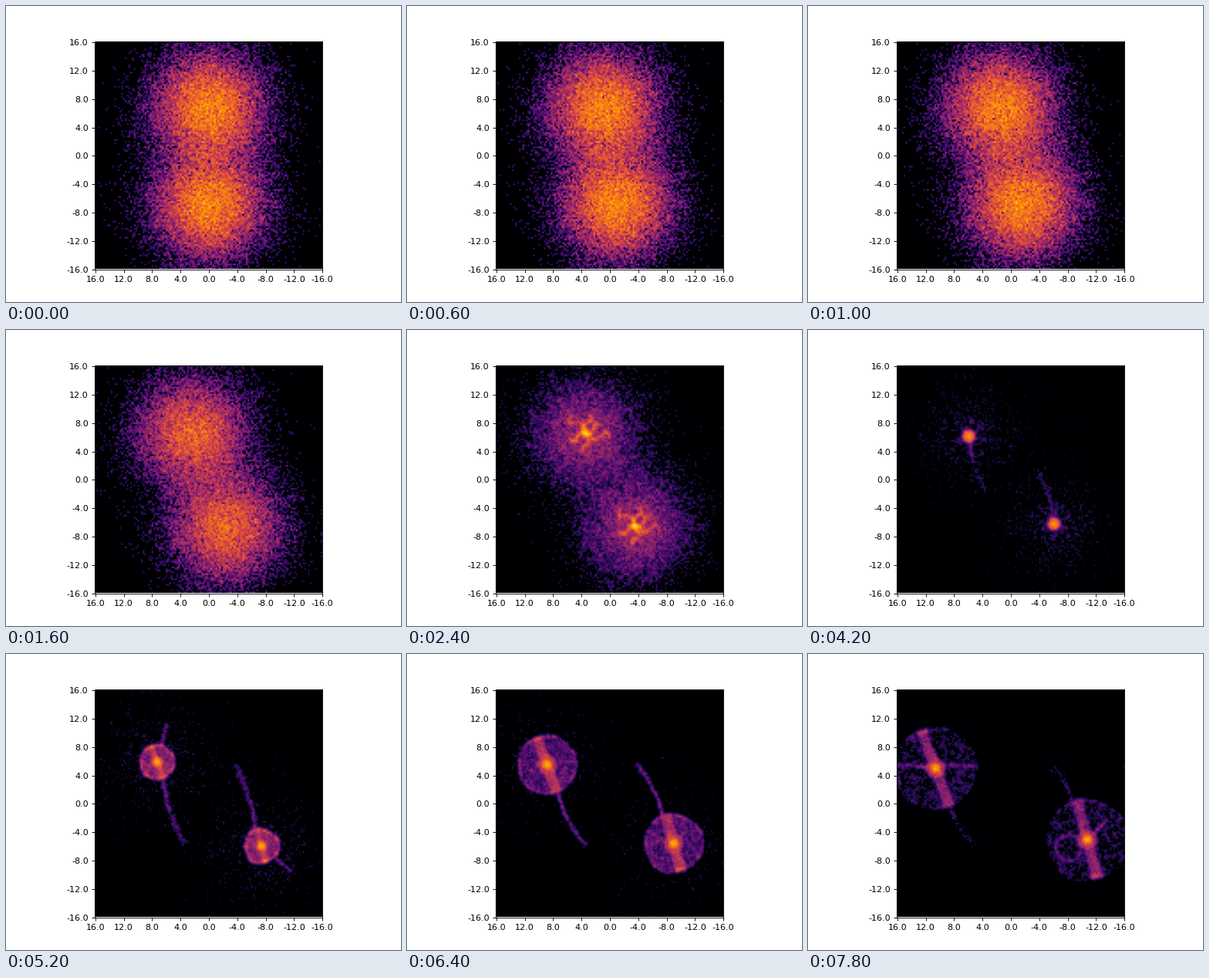
Write a matplotlib script that moves like this. It is 512x384 px and loops after 8000 ms.

```python
import numpy as np
import matplotlib.pyplot as plt
from matplotlib.animation import FuncAnimation

FRAMES, STEP = 40, 200
GRID, HALF = 128, 16
CELL = 2 * HALF / GRID
POOL = 24000


def ramp(t, a, b):
    x = np.clip((t - a) / (b - a), 0, 1)
    return x * x * (3 - 2 * x)


def bump(t, mid, width):
    return np.exp(-((t - mid) / width) ** 2)


# Visible particles of each part over time (seconds): gas falls in
# until 3.5 s, then a shell with a bar and a tail grows out of the core.
COUNTS = {
    "halo": lambda t: 22000 * bump(max(t, .8), .8, 1.56)
    + 450 * ramp(t, 3, 4) * (1 - ramp(t, 5, 8)),
    "core": lambda t: 600 * ramp(t, 2, 3.2) + 3000 * bump(t, 3.5, .4),
    "arms": lambda t: 2300 * bump(t, 2.9, .75),
    "disc": lambda t: 1700 * ramp(t, 3.6, 6) * (1 - .4 * ramp(t, 6.4, 7.8)),
    "rim": lambda t: 500 * ramp(t, 3.6, 4.6) * bump(t, 5, 2),
    "caps": lambda t: 120 * ramp(t, 4, 5),
    "bar": lambda t: 1050 * ramp(t, 4.6, 6.2),
    "knot": lambda t: 450 * ramp(t, 4.9, 6.2),
    "tail": lambda t: 200 * ramp(t, 3.6, 5) * (1 - .75 * ramp(t, 6.6, 7.8)),
    "spike": lambda t: 60 * bump(t, 5, .6),
    "detail": lambda t: 230 * ramp(t, 5.6, 7.6),
}


def peak(t):
    return 36 + 90 * ramp(t, 1, 5) + 900 * bump(t, 3.5, .5)


def shell_radius(t):
    s = max(t - 3.8, 0)
    return 1.85 * s - .1 * s * s


def polar(r, a):
    return np.column_stack([r * np.cos(a), r * np.sin(a)])


class Cloud:
    """One collapsing cloud; side is 1 for upper left, -1 for lower right."""

    def __init__(self, seed, side, lobes, tilt, cap_share, spike):
        rng = np.random.default_rng(seed)
        self.side, self.lobes, self.cap_share = side, lobes, cap_share
        self.tilt, self.spike = np.radians(tilt), np.radians(spike)
        self.u = {name: rng.random((POOL, 2)) for name in COUNTS}
        self.g = {name: rng.normal(size=(POOL, 2)) for name in COUNTS}

    def take(self, name, t):
        n = int(COUNTS[name](t))
        return self.u[name][:n, 0], self.u[name][:n, 1], self.g[name][:n]

    def center(self, t):
        x = 1.5 * t - .017 * t * t
        y = 6.8 - .05 * t - .023 * t * t
        return self.side * np.array([-x, y])

    def edge(self, a, r):
        fade = min(1, 2.4 / max(r, .1))
        return r * (1 + self.lobes * fade * np.cos(3 * a)
                    + .015 * np.sin(5 * a + self.side))

    def infall(self, t):
        _, _, g = self.take("halo", t)
        yield (4.1 - 2 * bump(t, 3.5, .6)) * g

        _, _, g = self.take("core", t)
        yield (.34 - .19 * bump(t, 3.5, .4)) * g

        u, v, g = self.take("arms", t)
        k = np.floor(6 * u)
        r = (2.8 + .6 * np.sin(2 * k)) * v
        wiggle = .4 * (1 - .8 * ramp(t, 2, 3.6)) * np.sin(2.2 * r + 2 * k)
        a = k * np.pi / 3 + .35 * np.sin(5 * k) + 1.5 + wiggle
        yield polar(r, a) + (.18 - .08 * ramp(t, 2, 3.4)) * g

    def shell(self, t, r):
        u, v, _ = self.take("disc", t)
        a = 2 * np.pi * u
        yield polar(self.edge(a, r) * np.sqrt(v), a)

        u, v, g = self.take("rim", t)
        a = 2 * np.pi * u + .1 * np.sin(14 * np.pi * u)
        yield polar(self.edge(a, r) * (1 - .05 * v) + .04 * g[:, 0], a)

        u, v, g = self.take("caps", t)
        a = self.tilt + np.pi * (u > self.cap_share) + .14 * g[:, 0]
        yield polar(self.edge(a, r) * (.97 - .07 * v), a)

        u, v, _ = self.take("bar", t)
        along = .97 * r * (2 * u - 1)
        across = min(.17 * r, .68) * (2 * v - 1)
        yield polar(along, self.tilt) + polar(across, self.tilt + np.pi / 2)

        u, v, _ = self.take("knot", t)
        yield polar(min(1.35, .4 * r) * np.sqrt(u), 2 * np.pi * v)

        u, _, g = self.take("spike", t)
        yield polar(r + 3 * u, self.spike) + .12 * g

    def detail(self, t, r):
        u, v, g = self.take("detail", t)
        if self.side > 0:
            x = r * (2 * u - 1)
            return np.column_stack([x, .4 + .1 * np.sin(x)]) + .1 * g
        ring = polar(1.85, 2 * np.pi * u) + [-2.7, -1.2]
        ray = polar(4.2 * u, np.pi / 4)
        return r / 6 * np.where(v[:, None] < .65, ring, ray) + .08 * g

    def tail(self, t, r):
        u, _, g = self.take("tail", t)
        start = self.center(t) + self.side * r * np.array([.38, -.92])
        tip = [-3.5 - 1.7 * ramp(t, 6.4, 7.8), -5.8 * ramp(t, 3.6, 5.4)]
        end = self.side * np.array(tip)
        bend = (start + end) / 2 + self.side * np.array([-1.1, -.4])
        s = u[:, None]
        path = (1 - s) ** 2 * start + 2 * s * (1 - s) * bend + s * s * end
        spread = .08 + .25 * abs(ramp(t, 5, 7.8) - .5)
        return path + g * (.08 + spread * s)

    def points(self, t):
        r = shell_radius(t)
        parts = [*self.infall(t), *self.shell(t, r), self.detail(t, r)]
        return np.vstack([np.vstack(parts) + self.center(t), self.tail(t, r)])


CLOUDS = [Cloud(11, 1, .02, 110, .65, 76), Cloud(29, -1, .06, 105, .35, -41)]


def soften(h):
    for axis in (0, 1):
        h = .5 * h + .25 * (np.roll(h, 1, axis) + np.roll(h, -1, axis))
    return h


def picture(t):
    xy = np.vstack([c.points(t) for c in CLOUDS])
    span = [-HALF - CELL / 2, HALF - CELL / 2]
    h, _, _ = np.histogram2d(-xy[:, 1], xy[:, 0], GRID, [span, span])
    w = .55 * ramp(t, 1, 3)
    h = (1 - w) * h + w * soften(h)
    v = np.log1p(h) / np.log1p(peak(t))
    return np.where(v < .065, 0, np.minimum(v, 1))


fig, ax = plt.subplots(figsize=(6.4, 4.8), dpi=80)
image = ax.imshow(picture(0), cmap="inferno", vmin=0, vmax=1)
ticks = np.arange(0, GRID + 1, 16)
labels = [f"{HALF - i * CELL:.1f}" for i in ticks]
ax.set_xticks(ticks, labels)
ax.set_yticks(ticks, labels)


def update(i):
    image.set_data(picture(i * STEP / 1000))
    return [image]


anim = FuncAnimation(fig, update, frames=FRAMES, interval=STEP,
                     repeat=True, repeat_delay=0)
plt.show()
```
